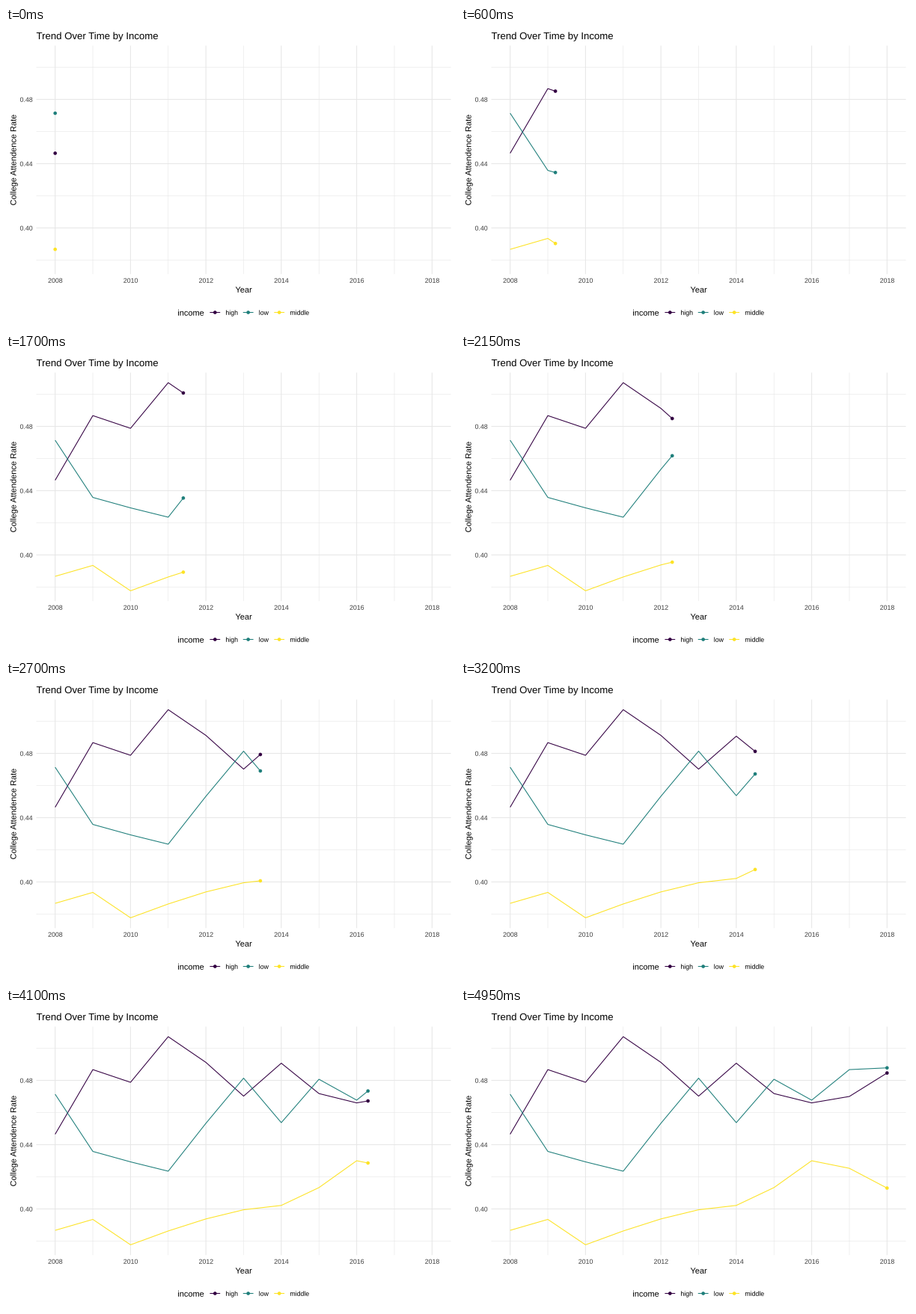
Recreate the animation shown at these times as a matplotlib script. Size 600 by 400 pixels, loop 5 s.

```python
import numpy as np
import matplotlib.pyplot as plt
from matplotlib.animation import FuncAnimation
from matplotlib.patches import Circle, PathPatch
from matplotlib.textpath import TextPath
from matplotlib.transforms import Affine2D

W, H, DPI = 600, 400, 100
FRAMES, INTERVAL = 100, 50
PX = 72 / DPI  # points per pixel

LEFT, RIGHT, TOP, BOTTOM = 40.5, 594.5, 23.6, 329.2
YEARS = np.arange(2008, 2019)
GRID, TICK = "#E7E7E7", "#3C3C3C"

# colour and yearly rates in percent
SERIES = {
    "high": ("#330042", [44.65, 48.67, 47.88, 50.72, 49.12, 47.02,
                         49.07, 47.18, 46.6, 47, 48.46]),
    "low": ("#1F7F7B", [47.14, 43.58, 42.93, 42.35, 45.33, 48.14,
                        45.37, 48.07, 46.77, 48.67, 48.78]),
    "middle": ("#FDE326", [38.67, 39.35, 37.77, 38.63, 39.38, 39.95,
                           40.22, 41.33, 43, 42.53, 41.3]),
}
# each year lands on a whole frame
YEAR_FRAMES = np.round(np.linspace(0, FRAMES - 1, len(YEARS)))

plt.rcParams["font.family"] = "Liberation Sans"

# axes in stage pixels, y pointing down
fig = plt.figure(figsize=(W / DPI, H / DPI), dpi=DPI, facecolor="white")
ax = fig.add_axes([0, 0, 1, 1])
ax.set_xlim(0, W)
ax.set_ylim(H, 0)
ax.axis("off")


def year_x(year):
    return LEFT + (RIGHT - LEFT) * (year - YEARS[0] + 0.5) / len(YEARS)


def rate_y(percent):
    return 267.5 - (np.asarray(percent) - 40) * 21.5


def stroke(xs, ys, color, width=1.07, z=2):
    return ax.plot(xs, ys, color=color, lw=width * PX, zorder=z, snap=False,
                   solid_capstyle="butt", solid_joinstyle="round")[0]


def dot(x, y, color):
    return ax.add_patch(Circle((x, y), 2.32, fc=color, lw=0, zorder=3,
                               snap=False))


def label(x, y, text, size, color="black", align=0, angle=0):
    """Place text with its baseline at y; align 0, 0.5, 1 = left to right."""
    path = TextPath((0, 0), text, size=size)
    width = path.get_extents().x1
    place = (Affine2D().translate(-align * width, 0).scale(1, -1)
             .rotate_deg(-angle).translate(x, y))
    ax.add_patch(PathPatch(path.transformed(place), fc=color, lw=0,
                           snap=False))
    return width


def draw_grid():
    for year in YEARS:
        x = year_x(year)
        major = year % 2 == 0
        stroke([x, x], [TOP, BOTTOM], GRID, 1.07 if major else 0.6, 1)
        if major:
            label(x, 340.8, str(year), 8.8, TICK, 0.5)
    for percent in range(38, 52, 2):
        y = rate_y(percent)
        major = percent % 4 == 0
        stroke([LEFT, RIGHT], [y, y], GRID, 1.07 if major else 0.6, 1)
        if major:
            label(35.3, y + 3.3, f"{percent / 100:.2f}", 8.8, TICK, 1)


def draw_legend(x=279.3, y=380.5):
    label(229.3, y + 4.2, "income", 11)
    for name, (color, _) in SERIES.items():
        stroke([x - 6.9, x + 6.9], [y, y], color)
        dot(x, y, color)
        x += 28.3 + label(x + 14.1, y + 3.3, name, 8.8)


draw_grid()
draw_legend()
label(40.5, 15, "Trend Over Time by Income", 13.2)
label((LEFT + RIGHT) / 2, 353.8, "Year", 11, align=0.5)
label(13.5, (TOP + BOTTOM) / 2 + 0.4, "College Attendence Rate", 11,
      align=0.5, angle=90)

tracks = [(stroke([], [], color), dot(0, 0, color), rate_y(rates))
          for color, rates in SERIES.values()]


def update(i):
    now = np.interp(i, YEAR_FRAMES, YEARS)
    past = YEARS < now
    xs = year_x(np.append(YEARS[past], now))
    for line, head, ys in tracks:
        y = np.interp(now, YEARS, ys)
        line.set_data(xs, np.append(ys[past], y))
        head.center = xs[-1], y
    return [artist for track in tracks for artist in track[:2]]


anim = FuncAnimation(fig, update, frames=FRAMES, interval=INTERVAL,
                     repeat=True, repeat_delay=0, blit=False)
plt.show()
```
